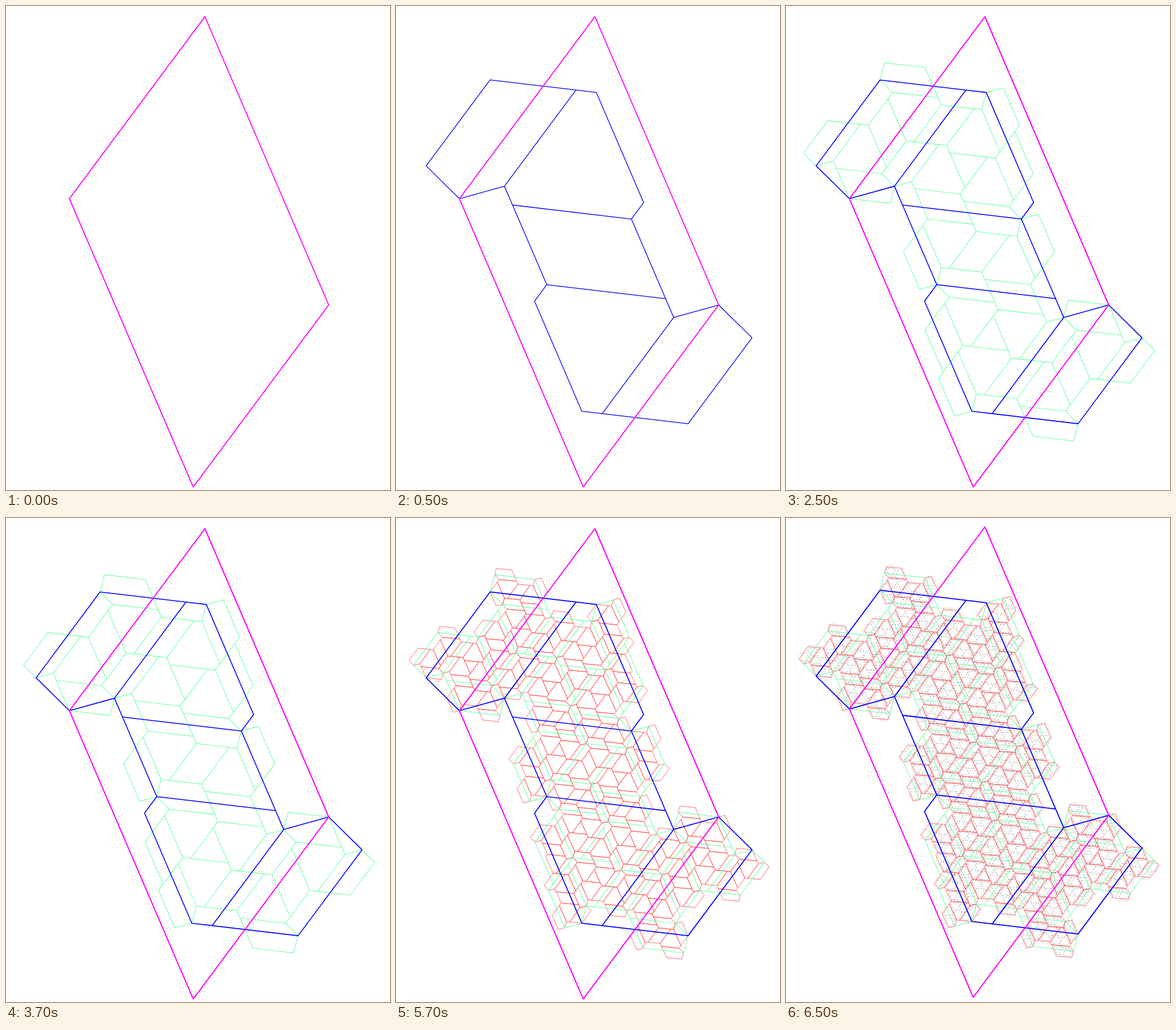
These frames come from a looping animation (667 by 839 pixels, 8 s). An HTML page with a canvas:

```html
<!DOCTYPE html>
<html lang="en">
<head>
<meta charset="utf-8">
<title>Metatile substitution</title>
<style>
  html, body { margin: 0; width: 100%; height: 100%; overflow: hidden; background: #fff; }
  canvas { display: block; }
</style>
</head>
<body>
<canvas id="stage" width="667" height="839"></canvas>
<script>
// Points are complex numbers [re, im]; a placement is z -> r * z + t.
const add = (a, b) => [a[0] + b[0], a[1] + b[1]];
const sub = (a, b) => [a[0] - b[0], a[1] - b[1]];
const mul = (a, b) => [a[0] * b[0] - a[1] * b[1], a[0] * b[1] + a[1] * b[0]];
const conj = a => [a[0], -a[1]];
const div = (a, b) => {
  const n = b[0] * b[0] + b[1] * b[1], q = mul(a, conj(b));
  return [q[0] / n, q[1] / n];
};
const turn = deg => [Math.cos(deg * Math.PI / 180), Math.sin(deg * Math.PI / 180)];
const place = (m, z) => add(mul(m.r, z), m.t);
const chain = (m, n) => ({ r: mul(m.r, n.r), t: place(m, n.t) });
const match = (a, b, p, q) => {
  const r = div(sub(q, p), sub(b, a));
  return { r, t: sub(p, mul(r, a)) };
};
const cross = (a, b) => a[0] * b[1] - a[1] * b[0];
const meet = (a, b, c, d) => {
  const u = sub(b, a), v = sub(d, c), k = cross(sub(c, a), v) / cross(u, v);
  return [a[0] + k * u[0], a[1] + k * u[1]];
};

// Base metatiles on the triangular lattice: x, rows.
const h = Math.sqrt(3) / 2;
const base = list => ({ shape: list.map(([x, k]) => [x, k * h]), kids: [] });
const first = {
  H: base([[0, 0], [4, 0], [4.5, 1], [2.5, 5], [1.5, 5], [-0.5, 1]]),
  T: base([[0, 0], [3, 0], [1.5, 3]]),
  P: base([[0, 0], [4, 0], [3, 2], [-1, 2]]),
  F: base([[0, 0], [3, 0], [3.5, 1], [3, 2], [-1, 2]])
};

// Each rule: neighbour, its edge, new tile, edge of the new tile.
const rules = `H|0 0 P 2|1 0 H 2|2 0 P 2|3 0 H 2|4 4 P 2|0 4 F 3|2 4 F 3|4 1 3 2 F 0|8 3 H 0|
9 2 P 0|10 2 H 0|11 4 P 2|12 0 H 2|13 0 F 3|14 2 F 1|15 3 H 4|8 2 F 1|17 3 H 0|18 2 P 0|
19 2 H 2|20 4 F 3|20 0 P 2|22 0 H 2|23 4 F 3|23 0 F 3|16 0 P 2|9 4 0 2 T 2|4 0 F 3`
  .split('|').map(s => s.trim().split(' '));

function buildPatch(tiles) {
  const kids = [];
  const corner = (i, k) => {
    const s = kids[i].tile.shape;
    return place(kids[i].m, s[k % s.length]);
  };
  for (const r of rules) {
    if (r.length === 1) {
      kids.push({ m: { r: [1, 0], t: [0, 0] }, tile: tiles[r[0]] });
      continue;
    }
    const edge = +r[r.length - 1], tile = tiles[r[r.length - 2]], s = tile.shape;
    const q = corner(+r[0], +r[1]);
    const p = r.length === 4 ? corner(+r[0], +r[1] + 1) : corner(+r[2], +r[3]);
    kids.push({ m: match(s[edge], s[(edge + 1) % s.length], p, q), tile });
  }
  return { kids, corner };
}

function inflate(tiles) {
  const { kids, corner } = buildPatch(tiles);
  const group = (shape, ids) => ({ shape, kids: ids.map(i => kids[i]) });
  const a = corner(8, 2), b = corner(21, 2), c = corner(6, 2), d = corner(7, 2), e = corner(25, 2);
  const ra = add(a, mul(turn(-120), sub(b, a)));
  const low = meet(a, ra, c, d);
  const w = sub(c, low), top = corner(14, 2);
  const H = [low, a, add(a, mul(turn(-60), w)), top, sub(top, mul(turn(-120), w)), c];
  const t0 = add(a, sub(H[4], c));
  const t1 = add(t0, mul(turn(-60), sub(H[2], t0)));
  return {
    H: group(H, [0, 9, 16, 27, 26, 6, 1, 8, 10, 15]),
    T: group([t0, t1, H[2]], [11]),
    P: group([d, add(d, sub(a, low)), a, low], [7, 2, 3, 4, 28]),
    F: group([b, corner(24, 2), corner(25, 0), e, add(e, sub(low, a))], [21, 20, 22, 23, 24, 25])
  };
}

let tiles = first;
for (let i = 0; i < 4; i++) tiles = inflate(tiles);
const root = tiles.P;

// Fit the outer rhomboid to the stage, y pointing down.
const fit = match(conj(root.shape[1]), conj(root.shape[3]), [345.5, 18.5], [325.2, 833.8]);
const layers = Array.from({ length: 5 }, () => new Path2D());
(function collect(tile, m, depth) {
  const path = layers[depth];
  tile.shape.forEach((z, i) => {
    const p = place(fit, conj(place(m, z)));
    i ? path.lineTo(p[0], p[1]) : path.moveTo(p[0], p[1]);
  });
  path.closePath();
  for (const k of tile.kids) collect(k.tile, chain(m, k.m), depth + 1);
})(root, { r: [1, 0], t: [0, 0] }, 0);

const stage = document.getElementById('stage');
const ctx = stage.getContext('2d');
const styles = [
  { color: '#ff00ff', dash: [] },
  { color: '#0000ff', dash: [] },
  { color: '#70ffa8', dash: [] },
  { color: '#ff4848', dash: [] },
  { color: 'rgba(0, 0, 0, 0.6)', dash: [1.2, 3.4] }
];

// Start time, vertical shift, line width per layer.
const steps = [
  { at: 0, dy: 0, widths: [1.8] },
  { at: 500, dy: 0, widths: [1.8, 1.3] },
  { at: 2500, dy: 0, widths: [2, 1.6, 1.1] },
  { at: 4500, dy: 0, widths: [2, 1.7, 1.1, 0.8] },
  { at: 6500, dy: -3, widths: [2, 1.8, 1.1, 0.8, 0.6] }
];

function draw({ dy, widths }) {
  ctx.setTransform(1, 0, 0, 1, 0, 0);
  ctx.fillStyle = '#fff';
  ctx.fillRect(0, 0, stage.width, stage.height);
  ctx.translate(0, dy);
  for (let i = widths.length - 1; i >= 0; i--) {
    ctx.lineWidth = widths[i];
    ctx.strokeStyle = styles[i].color;
    ctx.setLineDash(styles[i].dash);
    ctx.lineJoin = 'round';
    ctx.stroke(layers[i]);
  }
}

let shown = null;
const start = performance.now();
function tick() {
  const t = (performance.now() - start) % 8000;
  const step = steps.filter(s => s.at <= t).pop();
  if (step !== shown) draw(shown = step);
  requestAnimationFrame(tick);
}
tick();
</script>
</body>
</html>
```
